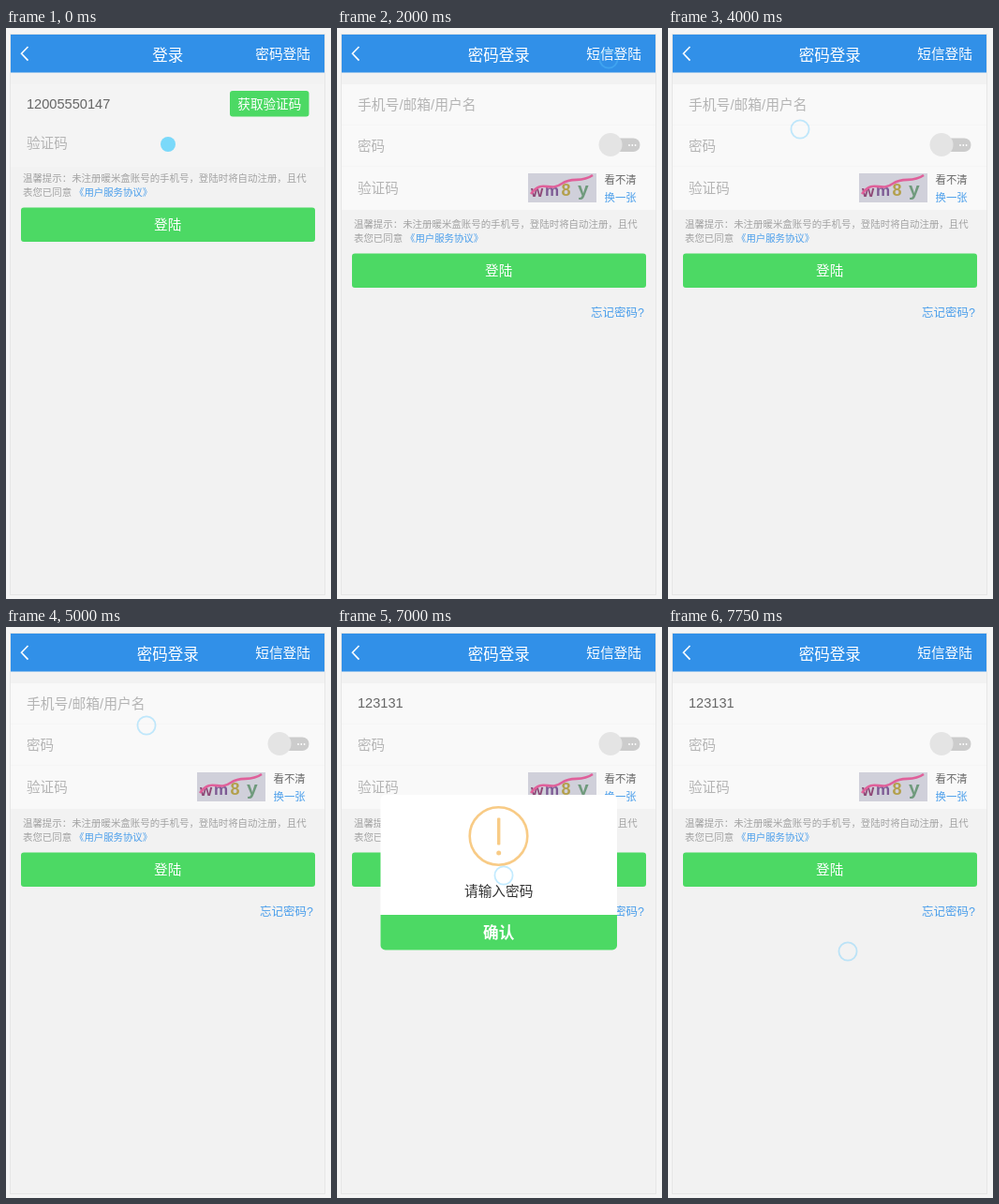
An HTML page with a canvas that plays this animation: 347x609 px, repeating every 8000 ms.

```html
<!DOCTYPE html>
<html lang="zh-CN">
<head>
<meta charset="utf-8">
<style>
  html, body { margin: 0; width: 347px; height: 609px; overflow: hidden; background: #f5f5f5; }
  canvas { display: block; width: 347px; height: 609px; }
</style>
</head>
<body>
<canvas></canvas>
<script>
const W = 347, H = 609, LOOP = 8000, STEP = 250;
const BLUE = '#3190e8', LINK = '#4a9eeb', GREEN = '#4cd964', HINT = '#b4b4b4', INK = '#666';
const FONT = '"Liberation Sans", "Noto Sans CJK SC", "Noto Sans CJK", sans-serif';
const PHONE = '12005550147', ACCOUNT = '123131';

const canvas = document.querySelector('canvas');
const ratio = window.devicePixelRatio || 1;
canvas.width = W * ratio;
canvas.height = H * ratio;
const ctx = canvas.getContext('2d');
ctx.scale(ratio, ratio);

// Pointer path: time, x, y
const path = [
  [0, 173, 124], [250, 173, 121], [500, 197, 104], [1000, 284, 66], [1250, 287, 39],
  [1500, 287, 56], [1750, 288, 31], [2000, 290, 33], [2750, 294, 165], [3250, 292, 210],
  [3750, 140, 102], [4250, 142, 114], [4750, 150, 101], [5000, 150, 105], [5250, 146, 84],
  [5750, 148, 92], [6250, 168, 213], [6500, 168, 258], [7000, 178, 265], [7500, 191, 332],
  [7750, 192, 346], [LOOP, 192, 346]
];
const clicks = [0, 1750, 5250, 6500, 7500];

function rect(x, y, w, h, color, radius = 0) {
  ctx.fillStyle = color;
  ctx.beginPath();
  ctx.roundRect(x, y, w, h, radius);
  ctx.fill();
}

function disc(x, y, r, color) {
  ctx.fillStyle = color;
  ctx.beginPath();
  ctx.arc(x, y, r, 0, Math.PI * 2);
  ctx.fill();
}

function ring(x, y, r, color, width) {
  ctx.strokeStyle = color;
  ctx.lineWidth = width;
  ctx.beginPath();
  ctx.arc(x, y, r, 0, Math.PI * 2);
  ctx.stroke();
}

function line(points, color, width) {
  ctx.strokeStyle = color;
  ctx.lineWidth = width;
  ctx.beginPath();
  points.forEach(([x, y]) => ctx.lineTo(x, y));
  ctx.stroke();
}

// y is the vertical middle of the glyphs
function text(str, x, y, size, color, align = 'left', weight = 300) {
  ctx.font = `${weight} ${size}px ${FONT}`;
  ctx.textAlign = align;
  ctx.fillStyle = color;
  ctx.fillText(str, x, y + size * 0.37);
}

function input(value, y, caret) {
  text(value, 22, y, 14.6, INK);
  if (caret) rect(22 + ctx.measureText(value).width, y - 8, 1, 17, INK);
}

function frame(title, action) {
  rect(0, 0, W, H, '#f5f5f5');
  rect(4.5, 6.5, 336, 598, '#f2f2f2');
  ctx.strokeStyle = '#e6e6e6';
  ctx.lineWidth = 1;
  ctx.strokeRect(4.5, 6.5, 336, 598);
  rect(5, 7, 335, 40.5, BLUE);
  line([[23.5, 20], [16.5, 27.3], [23.5, 34.6]], '#fff', 1.6);
  text(title, 172.7, 28.5, 16.5, '#fff', 'center', 500);
  text(action, 325, 27.5, 14.7, '#fff', 'right');
}

function terms(y) {
  text('温馨提示：未注册暖米盒账号的手机号，登陆时将自动注册，且代', 18, y, 10.45, '#a2a2a2');
  text('表您已同意', 18, y + 14.5, 10.45, '#a2a2a2');
  text('《用户服务协议》', 73, y + 14.5, 10.4, LINK);
}

function loginButton(y) {
  rect(16, y, 314, 36.5, GREEN, 3);
  text('登陆', 172.7, y + 18.5, 14.6, '#fff', 'center');
}

function smsPage(t) {
  frame('登录', '密码登陆');
  rect(5, 60, 335, 88, '#f4f4f4');
  input(PHONE, 80.5, t >= 1500);
  rect(239, 67, 84.5, 27.5, GREEN, 3);
  text('获取验证码', 281.3, 80.5, 13.6, '#fff', 'center');
  text('验证码', 22, 122.5, 14.6, HINT);
  terms(160.5);
  loginButton(191.5);
}

function captcha() {
  rect(204, 155, 73, 31, '#d0d0da');
  text('w', 207, 174, 17, '#8f4a78', 'left', 700);
  text('m', 222, 173, 17, '#7d5a94', 'left', 700);
  text('8', 239.5, 172, 18, '#b3a04c', 'left', 700);
  text('y', 257, 171, 21, '#6f9a7c', 'left', 700);
  ctx.strokeStyle = '#e0609a';
  ctx.lineWidth = 2.6;
  ctx.beginPath();
  ctx.moveTo(207, 177);
  ctx.bezierCurveTo(220, 160, 226, 176, 240, 166);
  ctx.bezierCurveTo(252, 158, 260, 166, 273, 157);
  ctx.stroke();
}

function accountField(t) {
  const count = Math.max(0, (t - 5250) / STEP + 1);
  if (t >= 5500) input(ACCOUNT.slice(0, count), 81, t <= 6500);
  else {
    text('手机号/邮箱/用户名', 22, 81.5, 14.8, HINT);
    if (t >= 5250) input('', 81, true);
  }
}

function passwordPage(t) {
  frame('密码登录', '短信登陆');
  rect(5, 60, 335, 134, '#f9f9f9');
  rect(5, 103, 335, 1, '#f5f5f5');
  rect(5, 147, 335, 1, '#f5f5f5');

  accountField(t);
  text('密码', 22, 126, 14.6, HINT);
  text('验证码', 22, 170.5, 14.6, HINT);

  rect(282, 117.5, 41.5, 14.5, '#ccc', 7.2);
  disc(292, 124.5, 12.5, '#e4e4e4');
  [312, 315.3, 318.6].forEach(x => disc(x, 125, 0.9, '#fff'));

  captcha();
  text('看不清', 285.5, 162, 11.4, INK);
  text('换一张', 285.5, 180.5, 11.4, LINK);
  terms(209.5);
  loginButton(240.5);
  text('忘记密码?', 328, 303, 12.5, LINK, 'right');
}

function dialog() {
  rect(46.5, 179, 252.5, 165.5, '#fff', 5);
  rect(46.5, 307, 252.5, 37.5, GREEN, [0, 0, 5, 5]);
  ring(172.5, 223, 30.8, '#f8cb86', 2.6);
  rect(171, 203.5, 3.4, 29, '#f8cb86', 1);
  disc(172.7, 241, 2.5, '#f8cb86');
  text('请输入密码', 172.7, 281.5, 14.7, '#333', 'center');
  text('确认', 172.7, 325.5, 16.6, '#fff', 'center', 700);
}

function pointer(t) {
  const i = path.findIndex(([time]) => time > t);
  const [t0, x0, y0] = path[i - 1], [t1, x1, y1] = path[i];
  const k = (t - t0) / (t1 - t0);
  const x = x0 + (x1 - x0) * k, y = y0 + (y1 - y0) * k;
  if (clicks.includes(t)) disc(x, y, 8, 'rgba(0,190,255,.5)');
  else ring(x, y, 9.6, 'rgba(90,200,255,.36)', 1.8);
}

const start = performance.now();

function draw() {
  const t = Math.floor((performance.now() - start) % LOOP / STEP) * STEP;
  if (t < 2000) smsPage(t);
  else passwordPage(t);
  if (t >= 6750 && t <= 7500) dialog();
  pointer(t);
  requestAnimationFrame(draw);
}

draw();
</script>
</body>
</html>
```
